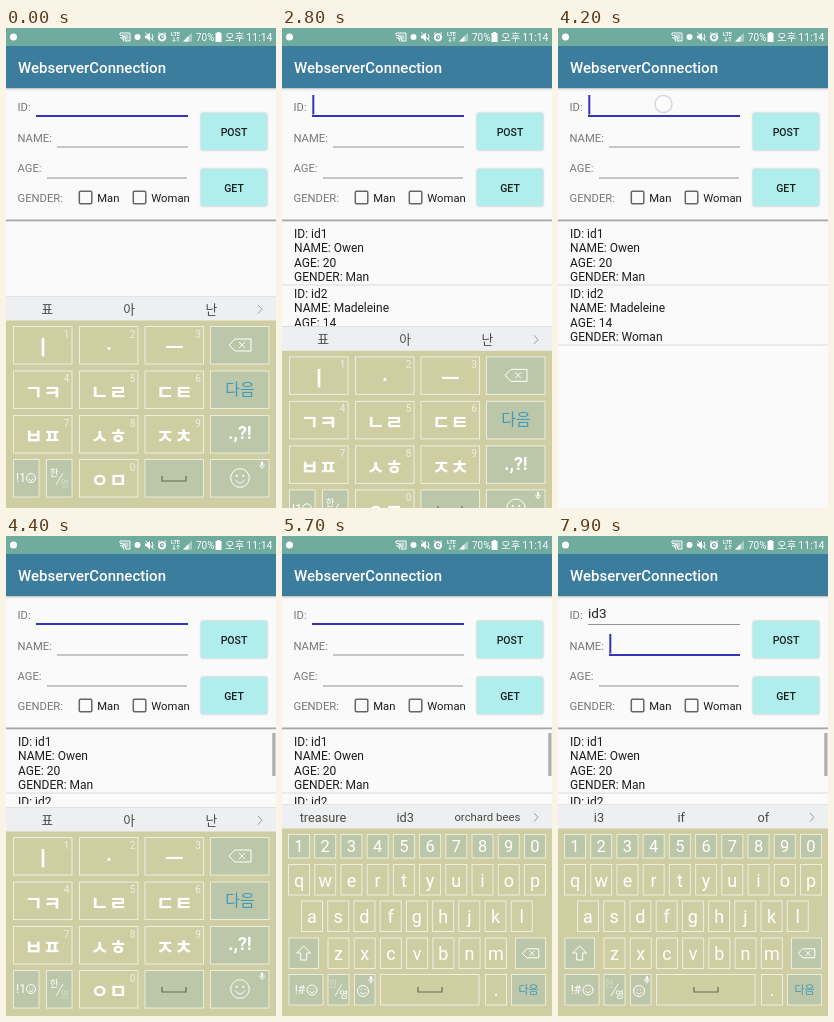
An HTML page for the animation above (8 s loop, 270x480 px).

```html
<!DOCTYPE html>
<html lang="ko">
<head>
<meta charset="utf-8">
<title>WebserverConnection</title>
<style>
  html, body { margin: 0; width: 100%; height: 100%; overflow: hidden; background: #fafafa; }
  svg { display: block; width: 270px; height: 480px; }
  text { font-family: Roboto, "Noto Sans CJK KR", "Noto Sans CJK", sans-serif; white-space: pre; }
  .raised { filter: drop-shadow(0 .8px .8px rgba(0, 0, 0, .28)); }
</style>
</head>
<body>
<svg id="stage" viewBox="0 0 270 480" xmlns="http://www.w3.org/2000/svg"></svg>
<script>
const LOOP = 8000;
const BLUE = '#3533ba', GREY = '#949494', NEXT_BLUE = '#429bbd';
const KEYBOARD_TOP = 268;

// --- drawing helpers -------------------------------------------------
const rect = (x, y, w, h, fill, more = '') =>
  `<rect x="${x}" y="${y}" width="${w}" height="${h}" fill="${fill}" ${more}/>`;
const text = (x, y, size, fill, str, more = '') =>
  `<text x="${x}" y="${y}" font-size="${size}" fill="${fill}" ${more}>${str}</text>`;
const centered = (x, y, size, fill, str, more = '') =>
  text(x, y + size * 0.36, size, fill, str, `text-anchor="middle" ${more}`);
const stroke = (d, color, width = 1, more = '') =>
  `<path d="${d}" fill="none" stroke="${color}" stroke-width="${width}" ${more}/>`;
const group = (id, content) => `<g id="${id}">${content}</g>`;
const smile = (x, y, r) =>
  `<circle cx="${x}" cy="${y}" r="${r}" fill="none" stroke="#fff"/>` +
  stroke(`M${x - r * .5} ${y + r * .2}Q${x} ${y + r * .9} ${x + r * .5} ${y + r * .2}`, '#fff') +
  [-1, 1].map(s => `<circle cx="${x + s * r * .35}" cy="${y - r * .25}" r="${r * .11}" fill="#fff"/>`).join('');

// --- status and title bar --------------------------------------------
function header() {
  const white = '#fff';
  return rect(0, 0, 270, 18, '#70ab9f') + rect(0, 18, 270, 42, '#3c7d9e') +
    rect(0, 60, 270, 1, '#000', 'opacity=".2"') + rect(0, 61, 270, 1.5, '#000', 'opacity=".07"') +
    '<circle cx="7.5" cy="9" r="3.5" fill="#fff"/>' +
    stroke('M114 7V5H124V13H120M114 9.5Q118 9.5 118 13.5M114 7.3Q120 7.3 120 13.5', white) +
    rect(116, 6.5, 6.5, 5, white, 'opacity=".5"') +
    '<circle cx="131.5" cy="9" r="3" fill="#fff"/>' +
    '<path d="M139 7.5h2l3-3v9l-3-3h-2z" fill="#fff"/>' +
    stroke('M139.5 4.5L148 13.5M146 6Q148 9 146 12', white) +
    '<circle cx="156" cy="9.3" r="3.2" fill="none" stroke="#fff" stroke-width="1.9"/>' +
    stroke('M156 7.5V9.5H157.5M152 6L153.5 4.5M160 6L158.5 4.5', white) +
    centered(169.5, 6.5, 5.5, white, 'LTE', 'font-weight="700"') +
    stroke('M168 9V13.5M166.5 12L168 13.5L169.5 12M172 13.5V9M170.5 10.5L172 9L173.5 10.5', white, .8) +
    '<path d="M177 13.5L186 4.5V13.5z" fill="#fff" opacity=".4"/><path d="M177 13.5L182.5 8V13.5z" fill="#fff"/>' +
    text(190, 12.8, 10, white, '70%') +
    rect(211, 4, 3, 2, white) + rect(209.5, 5, 6, 9, white) +
    text(219, 12.8, 10.5, white, '오후') +
    text(266.5, 12.8, 10.5, white, '11:14', 'text-anchor="end"') +
    text(12, 45, 15, white, 'WebserverConnection', 'font-weight="500"');
}

// --- form --------------------------------------------------------------
const button = (y, label) =>
  rect(195, y, 66, 37, '#afeeec', 'rx="1.5" class="raised"') +
  centered(228, y + 19.2, 10.5, '#1a1f1f', label, 'font-weight="500"');

function form() {
  const labels = ['ID:', 'NAME:', 'AGE:', 'GENDER:']
    .map((s, i) => text(11.5, 83.2 + i * 30.3, 11.25, '#787878', s)).join('');
  const box = (x, s) =>
    rect(x, 163.3, 12.5, 12.5, 'none', 'rx="1.2" stroke="#666" stroke-width="1.5"') +
    text(x + 18, 174, 11.25, '#1a1a1a', s);
  return labels + box(73.3, 'Man') + box(127.3, 'Woman') +
    rect(30, 87, 152, 2, BLUE, 'id="idLine"') + rect(51, 118.5, 131, 1, GREY, 'id="nameLine"') +
    rect(41, 149.5, 140, 1, GREY) +
    text(30, 82, 13.5, '#222', '', 'id="idText"') +
    rect(30, 67, 2, 19.5, BLUE, 'id="cursor"') +
    button(85, 'POST') + button(141, 'GET') +
    rect(195, 141, 66, 37, '#000', 'id="ripple" rx="1.5"') +
    rect(0, 191.5, 270, 1.8, '#a6a6a6');
}

function list() {
  const people = [['id1', 'Owen', 20, 'Man'], ['id2', 'Madeleine', 14, 'Woman']];
  const fields = ['ID', 'NAME', 'AGE', 'GENDER'];
  return people.map((person, p) =>
    person.map((v, i) => text(12, 210.3 + p * 60 + i * 14.1, 12, '#1c1c1c', `${fields[i]}: ${v}`)).join('') +
    rect(0, 256.5 + p * 60, 270, 1, '#dcdcdc')).join('');
}

// --- keyboard ------------------------------------------------------------
const key = (x, y, w, h, special) =>
  rect(x + .5, y + .5, w - 1, h - 1, special ? '#bbc7a8' : '#cfcea3',
    'stroke="#fff" stroke-opacity=".65"');
const backspace = (x, y, s) =>
  stroke(`M${x - 11 * s} ${y}l${6 * s} ${-6 * s}h${16 * s}v${12 * s}h${-16 * s}z` +
    `M${x - s} ${y - 3 * s}l${6 * s} ${6 * s}m0 ${-6 * s}l${-6 * s} ${6 * s}`, '#fff');
const space = (x, y) => stroke(`M${x - 12} ${y - 3}v5h24v-5`, '#666b58', 1.2);
const mic = (x, y) => rect(x - 1.2, y - 3.5, 2.4, 4.5, '#fff', 'rx="1.2"') +
  stroke(`M${x - 2.3} ${y - .5}q0 3 2.3 3t2.3 -3M${x} ${y + 2}v2`, '#fff', .8);
const language = (x, y, first, second, dimFirst) =>
  centered(x - 5, y - 5.5, 9.5, '#fff', first, `opacity="${dimFirst ? .4 : 1}"`) +
  stroke(`M${x - 3} ${y + 7}L${x + 4} ${y - 5}`, '#fff', .8) +
  centered(x + 5.5, y + 6, 9.5, '#fff', second, `opacity="${dimFirst ? 1 : .4}"`);

function koreanKeys() {
  const cols = [7, 73, 138.5], rows = [298, 342.5, 387, 431];
  const letters = [['ㅣ', '·', 'ㅡ'], ['ㄱㅋ', 'ㄴㄹ', 'ㄷㅌ'], ['ㅂㅍ', 'ㅅㅎ', 'ㅈㅊ']];
  const letterKey = (x, y, s, n) => key(x, y, 59.5, 38.5) +
    centered(x + 30, y + 22, 20, '#fff', s, 'font-weight="700"') +
    centered(x + 53.5, y + 8, 10, '#fff', n, 'opacity=".65"');
  return letters.map((row, r) =>
      row.map((s, c) => letterKey(cols[c], rows[r], s, r * 3 + c + 1)).join('')).join('') +
    rows.map(y => key(204, y, 59.5, 38.5, true)).join('') +
    backspace(234, 317, 1) + centered(234, 361, 16, NEXT_BLUE, '다음') +
    centered(234, 405, 18, '#fff', '.,?!', 'font-weight="700"') +
    smile(234, 450, 9.3) + mic(256, 437) +
    key(7, 431, 26.5, 38.5, true) + centered(15, 450, 12, '#fff', '!1') + smile(25, 450, 4.5) +
    key(40, 431, 26.5, 38.5, true) + language(53, 450, '한', '영') +
    letterKey(73, 431, 'ㅇㅁ', 0) + key(138.5, 431, 59.5, 38.5, true) + space(168, 451);
}

function englishKeys() {
  const pitch = 26.22;
  const row = (chars, x, y, h, special) => [...chars].map((s, i) =>
    key(x + i * pitch - 11, y, 22, h, special) +
    centered(x + i * pitch, y + h / 2 + (special ? 0 : .5), special ? 16.5 : 18, '#fff', s)).join('');
  return row('1234567890', 17, 298, 24.5, true) + row('qwertyuiop', 17, 328, 31.5) +
    row('asdfghjkl', 30, 364.5, 31.5) + row('zxcvbnm', 56.5, 401.5, 31.5) +
    key(6.5, 401.5, 30.5, 31.5, true) +
    stroke('M21.7 410l-7 7h4v7h6v-7h4z', '#fff') +
    key(233, 401.5, 31, 31.5, true) + backspace(248.5, 417.3, .75) +
    key(6.5, 438, 35, 31.5, true) + centered(18, 454, 12, '#fff', '!#') + smile(30, 454, 5) +
    key(45.5, 438, 22, 31.5, true) + language(56, 453, '한', '영', true) +
    key(72, 438, 21.5, 31.5, true) + smile(81, 455, 5.5) + mic(89, 443.5) +
    key(98, 438, 99.5, 31.5) + space(148, 454) +
    key(203, 438, 22, 31.5) + centered(214, 454, 18, '#fff', '.') +
    key(229, 438, 35, 31.5, true) + centered(246.5, 453.7, 11, NEXT_BLUE, '다음');
}

const suggestions = (words, sizes = [12.75, 12.75, 12.75]) =>
  words.map((w, i) => centered(41 + i * 82.2, 281, sizes[i], '#4a4a4a', w)).join('');

function keyboard() {
  return rect(0, KEYBOARD_TOP, 270, 212, '#cfcda2') +
    rect(0, KEYBOARD_TOP, 270, 24.5, '#eeeff0') + rect(0, KEYBOARD_TOP, 270, .7, '#dedfe0') +
    stroke('M252 277l4 4.3l-4 4.3', '#999') +
    group('korean', koreanKeys() + suggestions(['표', '아', '난'])) +
    group('english', englishKeys()) +
    group('predictions', suggestions(['treasure', 'id3', 'orchard bees'], [12.75, 12.75, 11.4])) +
    group('corrections', suggestions(['i3', 'if', 'of']));
}

const stage = document.getElementById('stage');
stage.innerHTML =
  `<clipPath id="viewport">${rect(0, 193, 270, 287, '#000', 'id="viewportBox"')}</clipPath>` +
  rect(0, 0, 270, 480, '#fafafa') + header() + form() +
  `<g id="list" clip-path="url(#viewport)">${list()}</g>` +
  rect(266.3, 197, 3.2, 43, '#adadad', 'id="scrollbar"') + group('keyboard', keyboard()) +
  '<circle id="pointer" r="8.5" fill="#fff" fill-opacity=".65" stroke="#c3c7df" stroke-width="1.3"/>';

// --- animation -------------------------------------------------------------
const el = Object.fromEntries([...stage.querySelectorAll('[id]')].map(e => [e.id, e]));
const clamp = v => Math.min(1, Math.max(0, v));
const between = (t, [from, to]) => t >= from && t < to;
const show = (e, on) => e.setAttribute('display', on ? 'inline' : 'none');
const set = (e, attrs) => Object.entries(attrs).forEach(([k, v]) => e.setAttribute(k, v));

const cursorOn = [[200, 1100], [1200, 1700], [2700, 3200], [4000, 4400], [4700, 5200], [5800, LOOP]];
// x, y, down, fade start, gone
const taps = [
  [237, 165, 700, 1100, 1300], [105.5, 76, 3700, 4100, 4300], [56, 452, 5200, 5300, 5500],
  [200.5, 343, 6000, 6100, 6250], [82.5, 380, 6350, 6450, 6600], [69.5, 310, 6750, 6850, 7000],
];
const typed = [[6100, 'i'], [6450, 'id'], [6900, 'id3']];
const HIDE = 2550, REOPEN = 4240, SWITCH = 5400, CORRECT = 6900, FOCUS_NAME = 7400;

// Accelerates off the bottom edge, later settles back in from just below.
function keyboardPose(t) {
  if (t < REOPEN) {
    return { shift: 30 * Math.max(0, (t - HIDE) / 250) ** 3, alpha: 1 - clamp((t - 2850) / 150) };
  }
  return { shift: 21 * (1 - clamp((t - REOPEN) / 500)) ** 5, alpha: clamp((t - REOPEN) / 130) };
}

function draw(t) {
  const { shift, alpha } = keyboardPose(t);
  show(el.keyboard, alpha > 0);
  set(el.keyboard, { transform: `translate(0 ${shift.toFixed(2)})`, opacity: alpha });
  show(el.korean, t < SWITCH);
  show(el.english, t >= SWITCH);
  show(el.predictions, between(t, [SWITCH, CORRECT]));
  show(el.corrections, t >= CORRECT);
  show(el.list, t >= 1700);
  show(el.scrollbar, t >= 4300);
  set(el.viewportBox, { height: (between(t, [HIDE, 4300]) ? 480 : KEYBOARD_TOP) - 193 });

  const entry = typed.filter(([at]) => t >= at).pop();
  el.idText.textContent = entry ? entry[1] : '';
  const onName = t >= FOCUS_NAME;
  set(el.idLine, onName ? { y: 88, height: 1, fill: GREY } : { y: 87, height: 2, fill: BLUE });
  set(el.nameLine, onName ? { y: 118, height: 2, fill: BLUE } : { y: 118.5, height: 1, fill: GREY });

  const textEnd = entry ? 30.5 + el.idText.getComputedTextLength() : 30.3;
  set(el.cursor, onName ? { x: 51.3, y: 98 } : { x: textEnd, y: 67 });
  show(el.cursor, cursorOn.some(span => between(t, span)));

  set(el.ripple, { opacity: t < 1100 ? 0 : .12 * clamp((1500 - t) / 300) });
  const tap = taps.find(([, , down, , gone]) => between(t, [down, gone]));
  show(el.pointer, tap);
  if (tap) {
    const [x, y, , fade, gone] = tap;
    set(el.pointer, { cx: x, cy: y, opacity: 1 - clamp((t - fade) / (gone - fade)) * .5 });
  }
}

const start = performance.now();
function tick() {
  draw((performance.now() - start) % LOOP);
  requestAnimationFrame(tick);
}
tick();
</script>
</body>
</html>
```
